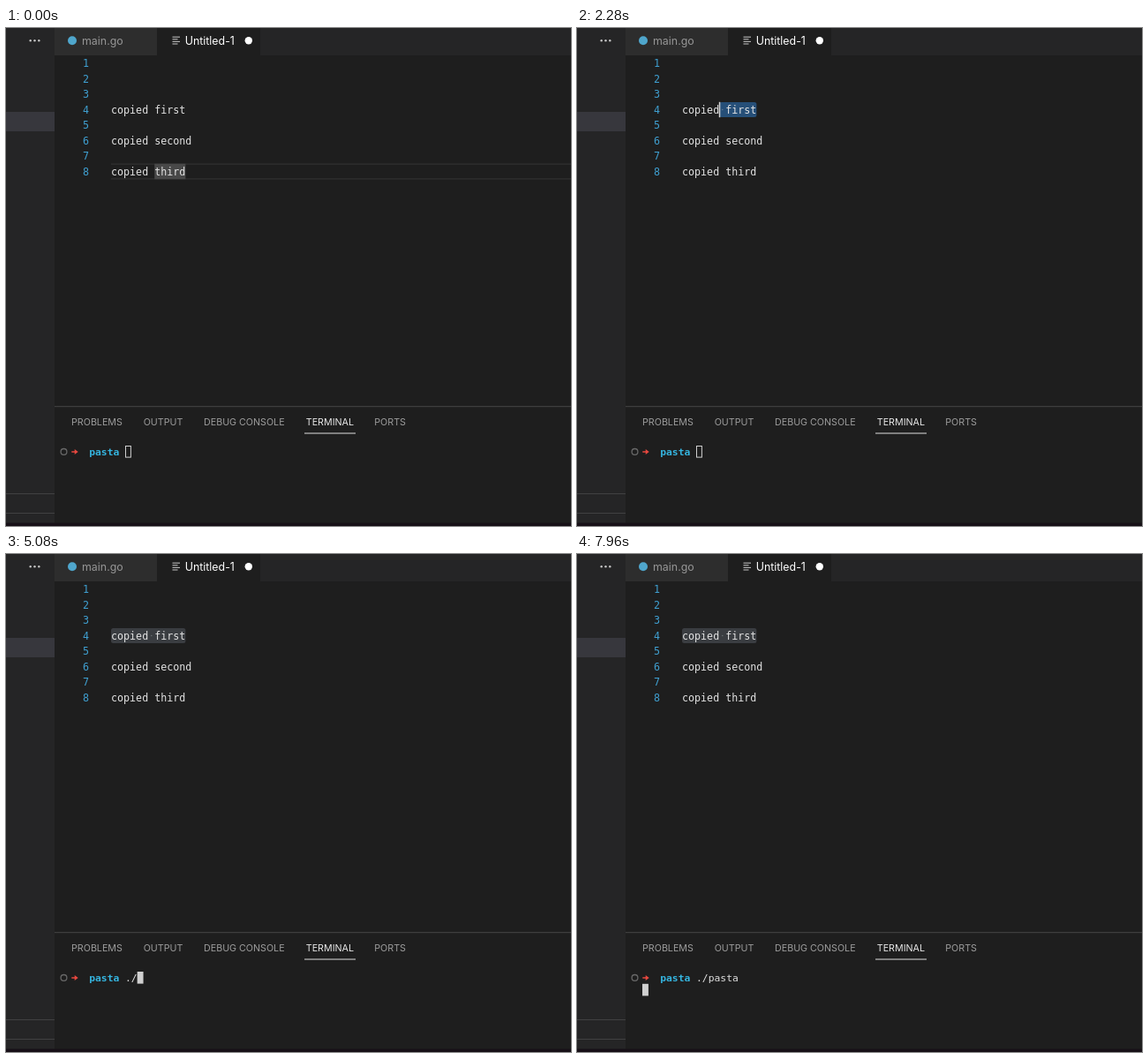
Recreate the animation shown at these times as an HTML page. Size 640 by 564 pixels, loop 8000 ms.

```html
<!DOCTYPE html>
<html lang="en">
<head>
<meta charset="utf-8">
<title>Editor and terminal</title>
<style>
  html, body { margin: 0; width: 100%; height: 100%; overflow: hidden; background: #1e1e1e; }
  svg { display: block; width: 640px; height: 564px; }
  text { white-space: pre; }
  .ui { font-family: Inter, sans-serif; font-size: 12.4px; }
  .panel { font-family: Inter, sans-serif; font-size: 10.7px; fill: #9d9d9d; }
  .code { font-family: "DejaVu Sans Mono", monospace; font-size: 11.68px; fill: #e4e4e4; }
  .num { fill: #3f9fd0; text-anchor: end; }
  .term { font-family: "DejaVu Sans Mono", monospace; font-size: 11.35px; fill: #e0e0e0; }
</style>
</head>
<body>
<svg viewBox="0 0 640 564">
  <rect width="640" height="564" fill="#1e1e1e"/>

  <!-- tab bar -->
  <rect x="55" width="585" height="31" fill="#252526"/>
  <rect x="55" width="116" height="31" fill="#2d2d2d"/>
  <rect x="171" width="117" height="31" fill="#1e1e1e"/>
  <circle cx="75" cy="14.3" r="5" fill="#4fa6cc"/>
  <text class="ui" x="86" y="18.7" fill="#969696">main.go</text>
  <path d="M188.5 10.2h8.5M188.5 12.8h6M188.5 15.4h8.5M188.5 18h6" stroke="#c8c8c8"/>
  <text class="ui" x="202.7" y="18.7" fill="#fff">Untitled-1</text>
  <circle cx="274.8" cy="14.2" r="4.2" fill="#fff"/>

  <!-- side bar -->
  <rect width="55" height="564" fill="#252526"/>
  <rect y="95" width="55" height="22" fill="#37373d"/>
  <path d="M0 527.5h55M0 549.5h55" stroke="#414142"/>
  <g fill="#c5c5c5">
    <circle cx="27.7" cy="14.3" r="1.2"/><circle cx="32.5" cy="14.3" r="1.2"/><circle cx="37.3" cy="14.3" r="1.2"/>
  </g>

  <!-- editor -->
  <path id="lineFrame" stroke="#303030" stroke-width="1.4" fill="none"/>
  <rect id="word" height="17.5" fill="#484848"/>
  <rect id="selection" height="17.2" rx="2.5"/>
  <rect id="twin" x="168.4" y="153.8" width="7" height="17.4" fill="#3a3a3d"/>
  <g id="lines"></g>
  <circle id="space" cx="164.8" cy="92.5" r=".8" fill="#9aa0a6" opacity=".5"/>
  <rect id="caret" y="83.8" width="1.5" height="17.4" fill="#d4d4d4"/>

  <!-- panel -->
  <path d="M55 428.7h585" stroke="#454545"/>
  <text class="panel" x="74" y="450">PROBLEMS</text>
  <text class="panel" x="155.7" y="450">OUTPUT</text>
  <text class="panel" x="224" y="450">DEBUG CONSOLE</text>
  <text class="panel" x="339.8" y="450" style="fill:#e7e7e7">TERMINAL</text>
  <text class="panel" x="417.3" y="450">PORTS</text>
  <path d="M338 459h58" stroke="#e0e0e0"/>
  <circle cx="65.5" cy="479.9" r="3.4" fill="none" stroke="#686868" stroke-width="1.3"/>
  <path d="M74.3 479.2h3.4v-2.2l4 3-4 3v-2.2h-3.4z" fill="#e8483f"/>
  <text class="term" x="94.2" y="484" style="fill:#35b5e0;font-weight:bold">pasta</text>
  <text class="term" id="command" x="135" y="484"></text>
  <rect id="block"/>
  <rect y="560.5" width="640" height="3.5" fill="#171017"/>
</svg>
<script>
const LOOP = 8000, LEFT = 119, CHAR = 7.032, ROW = 17.5, TOP = 31.2;
const TERM_LEFT = 135, TERM_CHAR = 6.83;
const CLICK = 1640, DRAG = 1920, DRAG_END = 2420, FOCUS = 4320, ENTER = 7480;
const typing = [
  [0, ''], [4720, '.'], [4920, './'], [5160, './p'], [5280, './pa'], [5360, './pat'],
  [5440, './pats'], [5560, './patsa'], [5800, './pats'], [5920, './pat'], [6120, './pa'],
  [6440, './pas'], [6600, './past'], [6760, './pasta']
];
const content = { 4: 'copied first', 6: 'copied second', 8: 'copied third' };

const el = id => document.getElementById(id);
const set = (id, attrs) => {
  for (const name in attrs) el(id).setAttribute(name, attrs[name]);
};
const show = (id, on) => set(id, { visibility: on ? 'visible' : 'hidden' });
const rowTop = n => TOP + (n - 1) * ROW;
const columnX = n => LEFT + n * CHAR;

function addText(cls, x, row, value) {
  const node = document.createElementNS('http://www.w3.org/2000/svg', 'text');
  node.setAttribute('class', cls);
  node.setAttribute('x', x);
  node.setAttribute('y', rowTop(row) + 12.8);
  node.textContent = value;
  el('lines').append(node);
}
for (let row = 1; row <= 8; row++) {
  addText('code num', 94, row, row);
  if (content[row]) addText('code', LEFT, row, content[row]);
}

function drawEditor(t) {
  const row = t < CLICK ? 8 : 4;
  const selecting = t >= DRAG;
  const progress = Math.min(1, Math.max(0, (t - DRAG) / (DRAG_END - DRAG)));
  const length = selecting ? Math.min(12, 1 + Math.floor(progress * progress * 11.01)) : 0;
  const headX = columnX(12 - length);
  const top = rowTop(row);

  show('lineFrame', !selecting);
  set('lineFrame', { d: `M641 ${top + .4}H${LEFT}M${LEFT} ${top + 17.2}H641` });
  show('word', t < CLICK);
  set('word', { x: columnX(7), y: rowTop(8), width: 5 * CHAR });
  show('selection', selecting);
  set('selection', {
    x: headX, y: rowTop(4) + .2, width: length * CHAR,
    fill: t < FOCUS ? '#264f78' : '#3a3d41'
  });
  show('twin', length === 1);
  show('space', length > 5);

  const moving = t >= CLICK && t < DRAG_END;
  const blinkOn = (t - 2300) % 1000 < 500;
  show('caret', moving || (t >= DRAG_END && t < FOCUS && blinkOn));
  set('caret', { x: headX - .4 });
}

function drawTerminal(t) {
  const command = typing.findLast(([start]) => t >= start)[1];
  const focused = t >= FOCUS, entered = t >= ENTER;
  const inset = focused ? 0 : .5;
  el('command').textContent = command;
  set('block', {
    x: (entered ? 74 : TERM_LEFT + command.length * TERM_CHAR) + inset,
    y: (entered ? 486.8 : 473) + inset,
    width: 6.9 - 2 * inset, height: 13.6 - 2 * inset,
    fill: focused ? '#d0d0d0' : 'none',
    stroke: focused ? 'none' : '#d0d0d0'
  });
}

function frame() {
  const t = performance.now() % LOOP;
  drawEditor(t);
  drawTerminal(t);
  requestAnimationFrame(frame);
}
frame();
</script>
</body>
</html>
```
